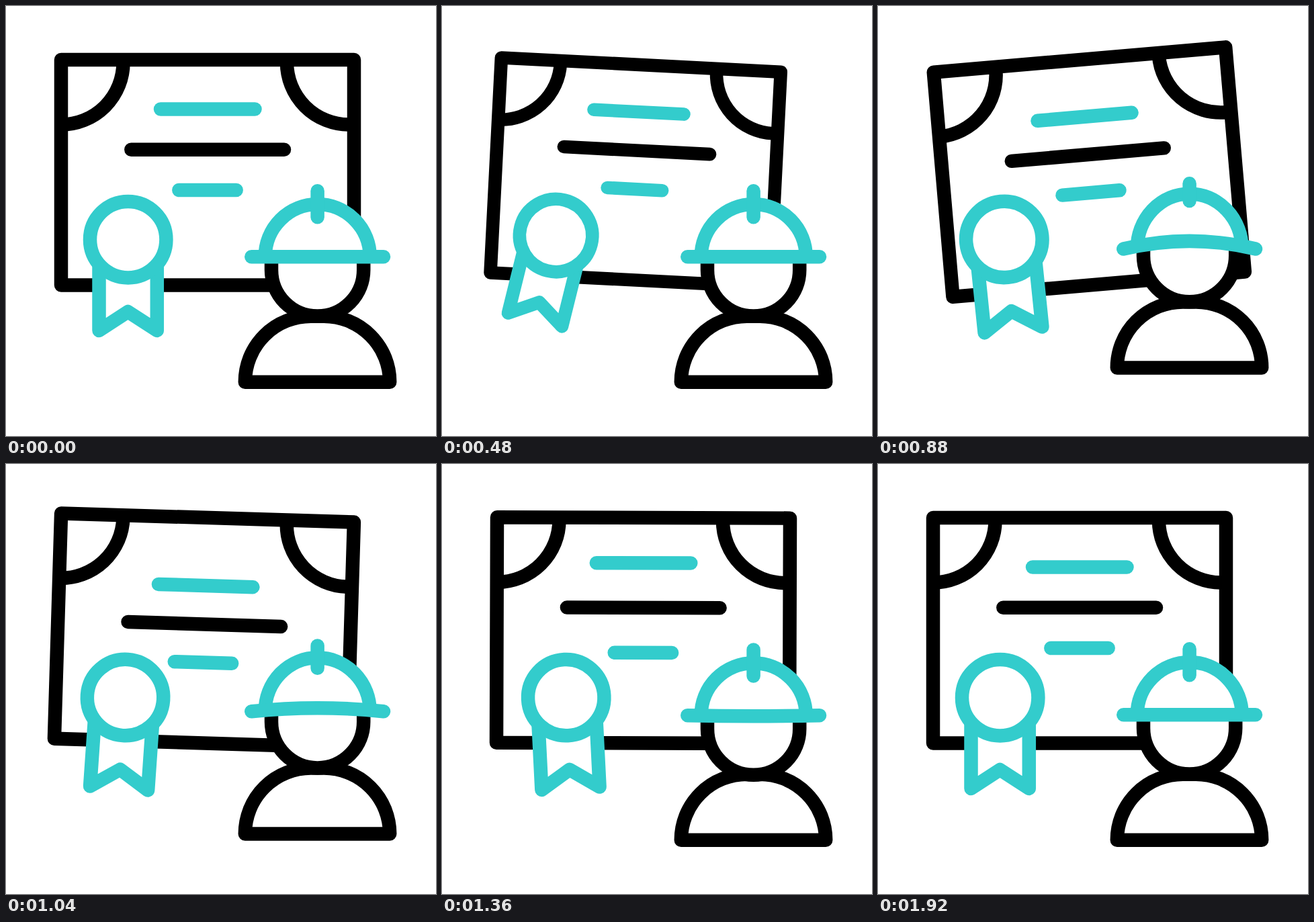
An HTML page for the animation above (2 s loop, 640x640 px).

```html
<!DOCTYPE html>
<html lang="en">
<head>
<meta charset="utf-8">
<title>Certified worker</title>
<style>
  html, body { margin: 0; width: 100%; height: 100%; overflow: hidden; background: #fff; }
  svg { display: block; width: 100%; height: 100%; }
  path, circle { fill: #fff; stroke: #000; stroke-width: 20.5; stroke-linejoin: round; }
  .teal { stroke: #3cc; }
  .line { fill: none; stroke-linecap: round; }
  .open { fill: none; }
</style>
</head>
<body>
<svg viewBox="0 0 640 640">
  <g id="award">
    <g id="sheet">
      <path d="M82 80H518V415.5H82Z"/>
      <path class="open" d="M174.5 80V84A92.5 92.5 0 0 1 82 176.5"/>
      <path class="open" d="M418 80V84A92.5 92.5 0 0 0 510.5 176.5H518"/>
      <path class="line teal row" d="M230 153.5H370.5"/>
      <path class="line row" d="M186.3 213.7H414"/>
      <path class="line teal row" d="M257.3 274H342.7"/>
    </g>
    <g id="seal">
      <path class="teal" d="M138.5 385V483L181.5 455L224.8 483V385"/>
      <circle class="teal" cx="181.7" cy="347.7" r="56.7"/>
    </g>
  </g>
  <path id="body" d="M355.8 559.7A98 98 0 0 1 453.8 461.7H473.2A98 98 0 0 1 571.2 559.7Z"/>
  <path id="head" d="M395 375V393A68.6 68.6 0 0 0 532.2 393V375"/>
  <path id="dome" class="teal"/>
  <path id="brim" class="line teal"/>
  <path id="knob" class="line teal"/>
</svg>
<script>
  const LOOP = 2000, STEP = 40;
  const $ = id => document.getElementById(id);
  const rows = document.querySelectorAll('.row');
  const set = (el, name, value) => el.setAttribute(name, value);

  // Eased value at time t through pairs of time, value.
  function track(t, ...keys) {
    if (t <= keys[0]) return keys[1];
    for (let i = 2; i < keys.length; i += 2) {
      if (t < keys[i]) {
        const u = (t - keys[i - 2]) / (keys[i] - keys[i - 2]);
        return keys[i - 1] + (keys[i + 1] - keys[i - 1]) * u * u * (3 - 2 * u);
      }
    }
    return keys[keys.length - 1];
  }

  function drawAward(t) {
    const scale = track(t, 130, 1, 440, .953, 760, 1);
    const swing = track(t, 130, 0, 440, 3.4, 760, -7.7, 1120, 3.1, 1400, 0);
    const dangle = track(t, 130, 0, 440, 15, 760, -10, 1120, 6, 1480, -6, 1920, 0);
    set($('award'), 'transform', `translate(218 248) scale(${scale}) translate(-218 -248)`);
    set($('sheet'), 'transform', `rotate(${swing} 300 80)`);
    set($('seal'), 'transform', `rotate(${dangle} 181.7 288)`);
    rows.forEach((row, i) => {
      const y = track(t - i * 35, 710, 0, 1110, 30, 1480, -18, 1850, 0);
      set(row, 'transform', `translate(0 ${y})`);
    });
  }

  function drawWorker(t) {
    const hop = track(t, 680, 0, 920, -23, 1200, 12, 1400, 0);
    const up = hop < 0;
    set($('body'), 'transform', `translate(0 ${Math.min(hop, 0)})`);
    set($('head'), 'transform', `translate(0 ${hop})`);

    // The brim's ends lag behind its middle.
    const bend = hop * (up ? .55 : .75);
    const base = 373.3 + bend;
    const top = 295 + hop * (up ? .73 : 1);
    set($('dome'), 'd', `M385.7 ${base}A78 ${base - top} 0 0 1 541.7 ${base}`);
    set($('brim'), 'd', `M365.3 ${base}Q463.6 ${base + 2 * bend} 562 ${base}`);
    set($('knob'), 'd', `M463.6 ${275.2 + hop * (up ? .52 : 1)}V${314.3 + hop * (up ? 1.14 : 1)}`);
  }

  const start = performance.now();
  function frame() {
    const t = Math.floor((performance.now() - start) % LOOP / STEP) * STEP;
    drawAward(t);
    drawWorker(t);
    requestAnimationFrame(frame);
  }
  frame();
</script>
</body>
</html>
```
